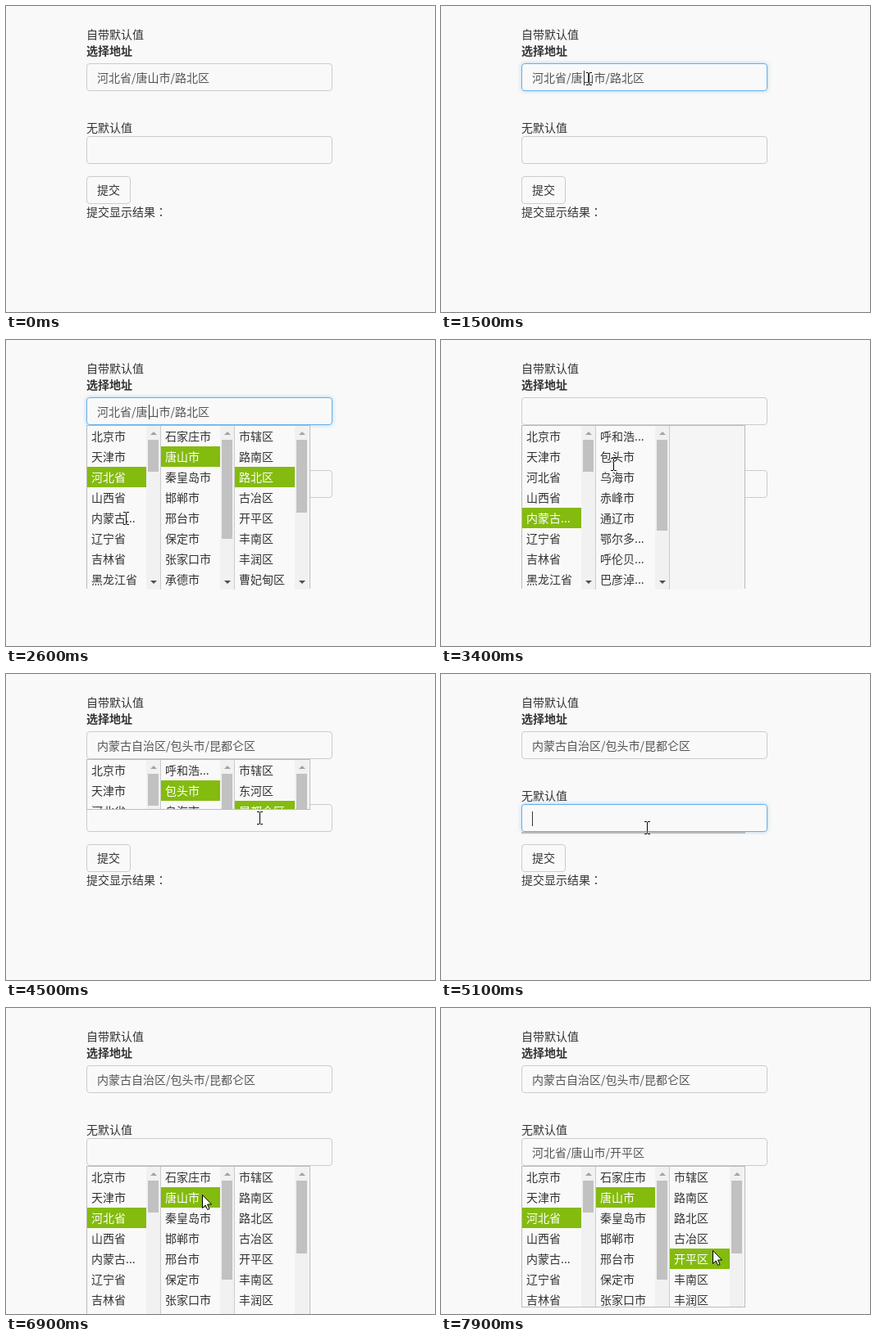
Animation of 523x374 px, one loop 8000 ms. Source, as an HTML page:

```html
<!DOCTYPE html>
<html lang="zh-CN">
<head>
<meta charset="utf-8">
<style>
html, body { margin: 0; width: 100%; height: 100%; overflow: hidden; }
body { position: relative; background: #f9f9f9; color: #333;
  font: 14px/20px "Noto Sans CJK SC", "Noto Sans CJK", "Noto Sans CJK JP", sans-serif; }
body * { box-sizing: border-box; position: absolute; white-space: nowrap; }
.label { left: 98px; }
.colon { left: 84px; font-family: "Noto Sans CJK TC", sans-serif; }
.field, .button { left: 98px; height: 34px; padding: 6px 12px; border: 1px solid #ccc; border-radius: 4px; }
.field { width: 300px; color: #555; }
.field i { top: 8px; width: 1px; height: 18px; background: #333; }
.button { width: 54px; top: 208px; padding-top: 5px; }
.focus { border-color: #66afe9; box-shadow: 0 0 5px rgba(102,175,233,.5); }
.picker { left: 98px; width: 273px; border: 1px solid #bbb; background: #f5f5f5; }
.column { top: 0; width: 90px; height: 200px; overflow: hidden; background: #f5f5f5; border-right: 1px solid #ccc; }
.column:last-child { width: 91px; border: 0; }
.column.filled { background: #f9f9f9; }
.item { left: 0; right: 17px; height: 25px; line-height: 25px; padding-left: 5px; }
.picked { background: #84bb0f; color: #fff; }
.bar { right: 0; width: 17px; height: 200px; background: #f1f1f1; }
.column:last-child .bar { right: 1px; }
.column:last-child .item { right: 18px; }
.thumb { left: 2px; top: 17px; width: 13px; background: #c1c1c1; }
.up, .down { left: 5px; border: 4px solid transparent; border-top-width: 0; border-bottom: 4px solid #a3a3a3; top: 7px; }
.down { border-top: 4px solid #505050; border-bottom: 0; top: 189px; }
#cursor { left: 0; top: 0; overflow: visible; }
</style>
</head>
<body>
<div class="label" style="top:24px">自带默认值</div>
<b class="label" style="top:44px">选择地址</b>
<div class="field" style="top:70px"></div>
<div class="label" style="top:138px">无默认值</div>
<div class="field" style="top:159px"></div>
<div class="button">提交</div>
<div class="label" style="top:241px">提交显示结果<span class="colon" lang="zh-TW">：</span></div>
<div class="picker" style="top:104px"></div>
<div class="picker" style="top:193px"></div>
<svg id="cursor" width="1" height="1">
  <path id="beam" d="M-3.5 -7.5H-.5M.5 -7.5H3.5M-3.5 7.5H-.5M.5 7.5H3.5M0 -7V7" fill="none" stroke="#fff"/>
  <path id="arrow" d="M.5 .5V16.5L4.2 13L6.7 18.5L9 17.5L6.6 12H11.5Z" fill="#fff" stroke="#000"/>
</svg>
<script>
const LOOP = 8000, STEP = 100, SLIDE = 400;
const list = (count, names) => ({ count, names: names.split(' ') });
const provinces = list(34, '北京市 天津市 河北省 山西省 内蒙古... 辽宁省 吉林省 黑龙江省');
const hebei = list(11, '石家庄市 唐山市 秦皇岛市 邯郸市 邢台市 保定市 张家口市 承德市');
const mongolia = list(12, '呼和浩... 包头市 乌海市 赤峰市 通辽市 鄂尔多... 呼伦贝... 巴彦淖...');
const tangshan = list(15, '市辖区 路南区 路北区 古冶区 开平区 丰南区 丰润区 曹妃甸区');
const baotou = list(10, '市辖区 东河区 昆都仑区 青山区 石拐区 白云鄂... 九原区 土默特...');

// Each state: start time, field text, then [list, picked row] per column
const forms = [
  { focus: [1500, 2700], caret: 75, open: 1525, close: 4250, states: [
    [0, '河北省/唐山市/路北区', [provinces, 2], [hebei, 1], [tangshan, 2]],
    [2700, '', [provinces, 4], [mongolia]],
    [3500, '', [provinces, 4], [mongolia, 1], [baotou]],
    [4300, '内蒙古自治区/包头市/昆都仑区', [provinces, 4], [mongolia, 1], [baotou, 2]]] },
  { focus: [5000, 5900], caret: 12, open: 5075, close: 7805, states: [
    [0, '', [provinces]],
    [5900, '', [provinces, 2], [hebei]],
    [6900, '', [provinces, 2], [hebei, 1], [tangshan]],
    [7800, '河北省/唐山市/开平区', [provinces, 2], [hebei, 1], [tangshan, 4]]] }
];

// time, x, y of the pointer
const path = [
  [100, 258, 85], [400, 225, 92], [700, 180, 89], [2100, 180, 89], [2600, 146, 218],
  [2900, 146, 218], [3400, 210, 152], [3500, 210, 150], [3800, 310, 164], [3900, 309, 165],
  [4400, 309, 165], [4500, 309, 176], [4800, 251, 186], [5000, 251, 188], [5200, 251, 188],
  [5700, 139, 254], [6200, 139, 254], [6700, 239, 228], [7100, 239, 228], [7200, 262, 211],
  [7400, 331, 313], [7500, 331, 296], [LOOP, 331, 296]
];
const ARROW_FROM = 6300;

const fields = document.querySelectorAll('.field');
const pickers = document.querySelectorAll('.picker');
const cursor = document.getElementById('cursor');
const beam = document.getElementById('beam');
const arrow = document.getElementById('arrow');

const swing = (t, start) => {
  const p = Math.min(1, Math.max(0, (t - start) / SLIDE));
  return 0.5 - Math.cos(p * Math.PI) / 2;
};

function columnHTML([source, picked] = [], index) {
  const left = `left:${index * 90}px`;
  if (!source) return `<div class="column" style="${left}"></div>`;
  const items = source.names.map((name, row) =>
    `<div class="item ${row === picked ? 'picked' : ''}" style="top:${row * 25}px">${name}</div>`).join('');
  const thumb = Math.round(166 * 8 / source.count);
  return `<div class="column filled" style="${left}">${items}<div class="bar"><div class="up"></div>
    <div class="thumb" style="height:${thumb}px"></div><div class="down"></div></div></div>`;
}

function drawForm(form, i, t) {
  const [, text, ...columns] = form.states.filter(s => s[0] <= t).pop();
  const focused = t >= form.focus[0] && t < form.focus[1];
  fields[i].className = focused ? 'field focus' : 'field';
  fields[i].innerHTML = text + (focused ? `<i style="left:${form.caret}px"></i>` : '');

  const shown = swing(t, form.open) - swing(t, form.close);
  const style = pickers[i].style;
  style.display = shown > 0 ? 'block' : 'none';
  style.height = Math.round(200 * shown) + 'px';
  style.overflow = shown < 1 ? 'hidden' : 'visible';
  pickers[i].innerHTML = [0, 1, 2].map(c => columnHTML(columns[c], c)).join('');
}

function drawCursor(t) {
  const isArrow = t >= ARROW_FROM;
  cursor.style.display = t < path[0][0] ? 'none' : 'block';
  cursor.style.mixBlendMode = isArrow ? 'normal' : 'difference';
  beam.style.display = isArrow ? 'none' : 'inline';
  arrow.style.display = isArrow ? 'inline' : 'none';
  const next = Math.max(1, path.findIndex(p => p[0] > t));
  const [t0, x0, y0] = path[next - 1], [t1, x1, y1] = path[next];
  const k = Math.max(0, (t - t0) / (t1 - t0));
  const x = Math.round(x0 + (x1 - x0) * k), y = Math.round(y0 + (y1 - y0) * k);
  const half = isArrow ? 0 : 0.5;
  (isArrow ? arrow : beam).setAttribute('transform', `translate(${x + half} ${y})`);
}

let last = -1;
function tick() {
  const t = Math.floor(performance.now() % LOOP / STEP) * STEP;
  if (t !== last) {
    forms.forEach((form, i) => drawForm(form, i, t));
    drawCursor(t);
    last = t;
  }
  requestAnimationFrame(tick);
}
tick();
</script>
</body>
</html>
```
